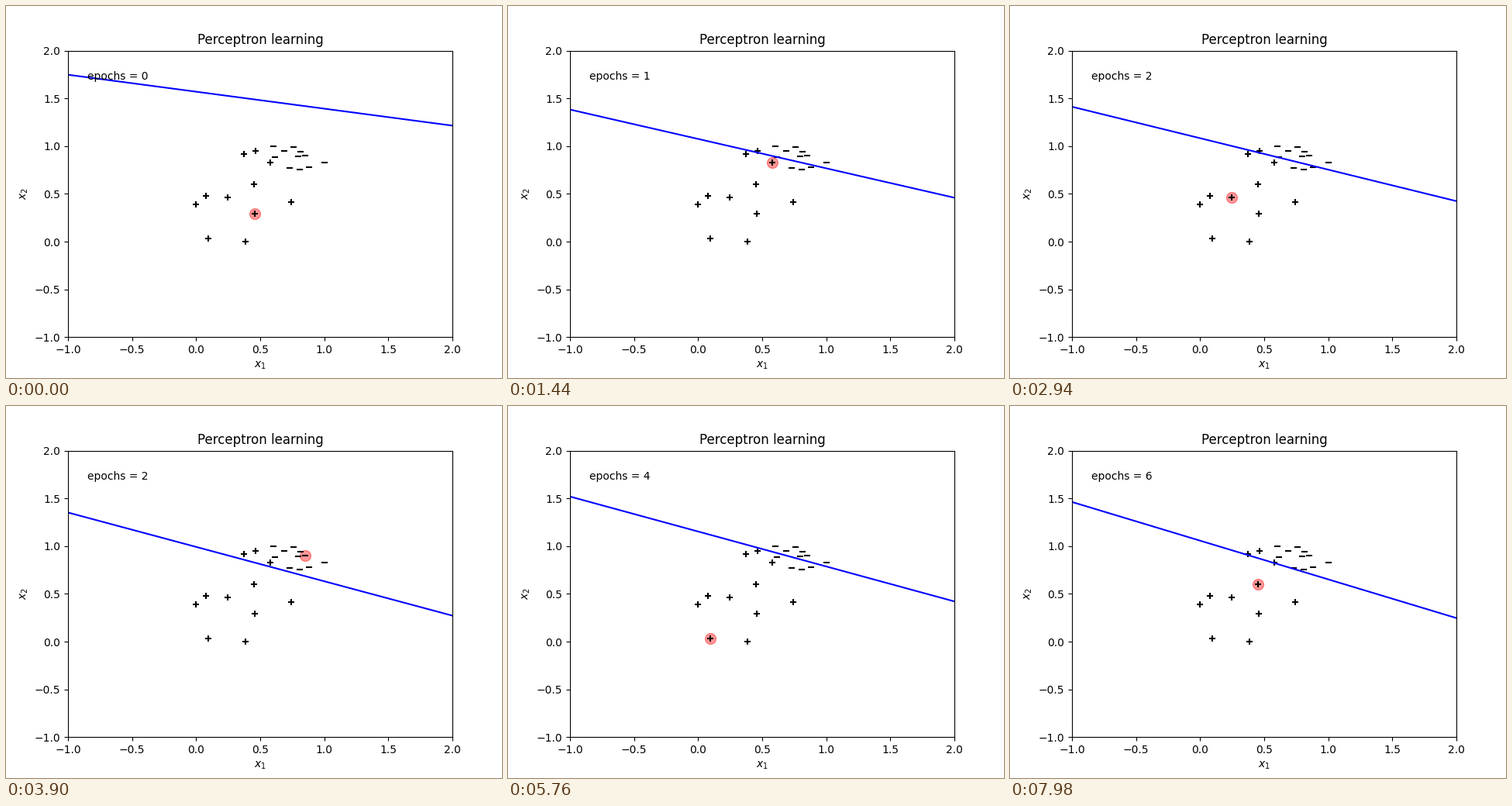
Recreate the animation shown at these times as a matplotlib script. Size 640 by 480 pixels, loop 8000 ms.

```python
import numpy as np
import matplotlib.pyplot as plt
from matplotlib.animation import FuncAnimation

TICK = 20          # ms per drawn frame
HOLD = 3           # drawn frames per training step
LOOP = 8000

# The two classes of samples, in training order
plus = np.array([
    (0.457, 0.292), (0.451, 0.601), (0.576, 0.825), (0.742, 0.414),
    (0.373, 0.917), (0.246, 0.463), (0.464, 0.950), (0.077, 0.479),
    (0.095, 0.032), (0.385, 0.000), (0.000, 0.390)])
minus = np.array([
    (1.000, 0.830), (0.760, 0.990), (0.8145, 0.942), (0.603, 1.000),
    (0.615, 0.888), (0.808, 0.758), (0.732, 0.7748), (0.6875, 0.950),
    (0.881, 0.779), (0.796, 0.893), (0.851, 0.901)])

points = np.vstack([plus, minus])
labels = np.repeat([1, -1], [len(plus), len(minus)])
inputs = np.column_stack([np.ones(len(points)), points])
ends = np.array([-1.0, 2.0])


def train(steps):
    """Weights (bias, w1, w2) after each single-sample update."""
    w = np.array([49.14, -5.56, -31.3])
    history = []
    for k in range(steps):
        i = k % len(points)
        if labels[i] * (w @ inputs[i]) <= 0:
            w = w + labels[i] * inputs[i]
        history.append(w)
    return history


frames = LOOP // TICK
history = train(-(-frames // HOLD))

plt.rcParams["font.family"] = "DejaVu Sans"
fig, ax = plt.subplots(figsize=(6.4, 4.8), dpi=100)
ax.set(xlim=(-1, 2), ylim=(-1, 2), title="Perceptron learning",
       xlabel="$x_1$", ylabel="$x_2$")

current = ax.scatter([0], [0], s=100, color="r", alpha=0.4, zorder=0.9)
ax.scatter(*plus.T, marker="+", color="k")
ax.scatter(*minus.T, marker="_", color="k")
boundary, = ax.plot([], [], "b-", lw=1.5)
counter = ax.text(0.05, 0.9, "", transform=ax.transAxes)


def draw(n):
    step = n // HOLD
    epoch, i = divmod(step, len(points))
    b, w1, w2 = history[step]
    boundary.set_data(ends, -(b + w1 * ends) / w2)
    current.set_offsets(points[i])
    counter.set_text(f"epochs = {epoch}")
    return boundary, current, counter


anim = FuncAnimation(fig, draw, frames=frames, interval=TICK,
                     init_func=lambda: draw(0), repeat=True, repeat_delay=0)
plt.show()
```
